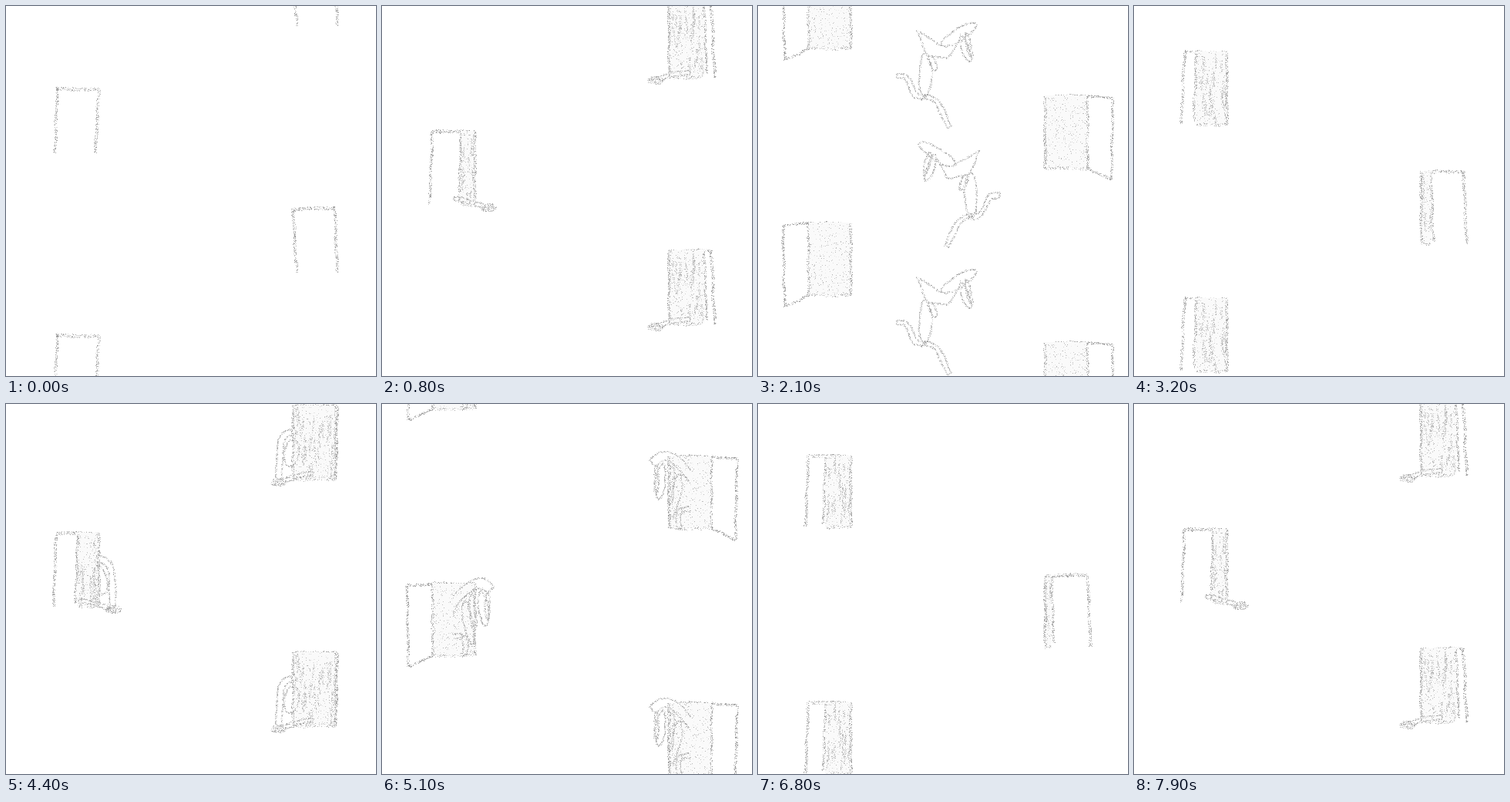
Animation, 480 px wide and 480 px high, one loop 8000 ms. Source, as an HTML page with a canvas:

```html
<!DOCTYPE html>
<html lang="en">
<head>
<meta charset="utf-8">
<title>Doors</title>
<style>
html, body { margin: 0; width: 100%; height: 100%; overflow: hidden; background: #fff; }
canvas { display: block; width: 480px; height: 480px; }
</style>
</head>
<body>
<canvas id="stage" width="480" height="480"></canvas>
<script>
const ctx = document.getElementById('stage').getContext('2d');
const STEP = 100, LOOP = 80, CYCLE = 71, HALF = CYCLE / 2;
const TILE = 320, MIRROR = 492;
const HINGE = 65, JAMB = 120, SILL = 96, SHUT = 54, OPEN = -33;

let seed = 1;
function rnd() {
  seed = (seed + 0x6D2B79F5) | 0;
  let a = Math.imul(seed ^ (seed >>> 15), 1 | seed);
  a = (a + Math.imul(a ^ (a >>> 7), 61 | a)) ^ a;
  return ((a ^ (a >>> 14)) >>> 0) / 4294967296;
}

function ease(t) {
  t = Math.max(0, Math.min(1, t));
  return t * t * (3 - 2 * t);
}

// Current placement of the drawing
const pen = { flip: false, x: 0, y: 0, lo: 0, hi: 480 };

function dot(x, y, dark) {
  x += pen.x;
  if (x < pen.lo || x > pen.hi) return;
  if (pen.flip) x = MIRROR - x;
  const g = Math.floor(dark + rnd() * (250 - dark));
  ctx.fillStyle = `rgb(${g},${g},${g})`;
  ctx.fillRect(Math.round(x), Math.round(y + pen.y), 1, 1);
}

// Grainy stroke along a polyline
function pencil(pts, width = 3.6, density = 3, dark = 150) {
  const phase = rnd() * 6;
  let run = 0;
  for (let i = 1; i < pts.length; i++) {
    const [ax, ay] = pts[i - 1], [bx, by] = pts[i];
    const len = Math.hypot(bx - ax, by - ay) || 1;
    const nx = (ay - by) / len, ny = (bx - ax) / len;
    for (let n = len * density; n > 0; n--) {
      const u = rnd();
      const off = (rnd() - 0.5) * width + Math.sin((run + u * len) * 0.13 + phase) * 0.6;
      dot(ax + (bx - ax) * u + nx * off, ay + (by - ay) * u + ny * off, dark);
    }
    run += len;
  }
}

const outline = pts => pencil(pts, 2.2, 2.2, 160);

// Catmull-Rom curve through the points
function smooth(p) {
  const out = [], at = i => p[Math.max(0, Math.min(p.length - 1, i))];
  for (let i = 0; i < p.length - 1; i++) {
    const [a, b, c, d] = [at(i - 1), at(i), at(i + 1), at(i + 2)];
    for (let t = 0; t < 1; t += 0.2) {
      out.push([0, 1].map(q => b[q] + 0.5 * t * (c[q] - a[q] +
        t * (2 * a[q] - 5 * b[q] + 4 * c[q] - d[q] +
        t * (3 * b[q] - a[q] - 3 * c[q] + d[q])))));
    }
  }
  return [...out, at(p.length)];
}

// Outline of a limb around a centre line
function tube(pts, r = 3) {
  const c = smooth(pts), left = [], right = [];
  c.forEach(([x, y], i) => {
    const a = c[Math.max(0, i - 1)], b = c[Math.min(c.length - 1, i + 1)];
    const l = Math.hypot(b[0] - a[0], b[1] - a[1]) || 1;
    const nx = (a[1] - b[1]) / l * r, ny = (b[0] - a[0]) / l * r;
    left.push([x + nx, y + ny]);
    right.unshift([x - nx, y - ny]);
  });
  outline([...left, ...right, left[0]]);
}

// Slim closed loop between two points
function petal(ax, ay, bx, by, w) {
  const len = Math.hypot(bx - ax, by - ay), pts = [];
  for (let i = 0; i <= 24; i++) {
    const a = i * Math.PI / 12, u = (1 - Math.cos(a)) / 2, v = Math.sin(a) * w / len;
    pts.push([ax + (bx - ax) * u + (ay - by) * v, ay + (by - ay) * u + (bx - ax) * v]);
  }
  outline(pts);
}

function shade(x0, x1, y0, y1, ajar) {
  const w = x1 - x0, h = y1 - y0;
  if (w < 2) return;
  ctx.fillStyle = '#fafafa';
  ctx.fillRect(Math.round(pen.flip ? MIRROR - x1 : x0), Math.round(y0 + pen.y), Math.round(w), Math.round(h));
  for (let n = w * h * 0.075; n > 0; n--) dot(x0 + rnd() * w, y0 + rnd() * h, 178);
  if (!ajar) return;
  for (let n = w * 0.6; n > 0; n--) {
    const x = x0 + rnd() * w, y = y0 + rnd() * h * 0.8;
    pencil([[x, y], [x + rnd() * 2 - 1, y + h * 0.2]], 2.5, 1.6, 175);
  }
}

function door(w, top) {
  const edge = HINGE + w, low = SILL + top * 0.3;
  const lean = top * 0.25;
  pencil([[HINGE, top], [JAMB, top + 1]], 4.5);
  if (w > SHUT - 6) {
    pencil([[HINGE + 1, top - 3], [HINGE - 2, low]]);
    pencil([[JAMB, top], [JAMB - lean, low]]);
    return;
  }
  const out = w < 0, from = out ? HINGE : edge;
  shade(from, JAMB, top, low, w > OPEN * 0.7);
  pencil([[JAMB, top], [JAMB, low]]);
  pencil([[from, low], [JAMB, low]], 4, 1.4, 165);
  if (out) {
    const corner = [edge + 2, low - w * 0.45];
    pencil([[HINGE, top], [HINGE, low]], 3, 2.4);
    pencil([[HINGE, top], [edge, top + 3], corner, [HINGE, low]], 3.2, 2.8, 140);
  } else {
    pencil([[HINGE, top], [HINGE - 4, low]]);
    pencil([[edge, top + 2], [edge - 3, low - 4]], 3, 2.6);
  }
}

function foot(p, arms) {
  pen.x = (p - 8) * 4;
  pen.lo = 92;
  tube([[92, 89], [112, 92], [132, 98]], 2.5);
  for (let n = 170; n > 0; n--) {
    const a = rnd() * 2 * Math.PI, r = Math.sqrt(rnd());
    dot(137 + Math.cos(a) * r * 11, 100 + Math.sin(a) * r * 5.5, 155);
  }
  if (arms) {
    tube([[114, 33], [133, 46], [136, 96]], 4);
    petal(116, 44, 124, 80, 9);
  }
}

function strider() {
  outline([[237, 93], [205, 73], [219, 106], [246, 110], [262, 83]]);
  petal(237, 93, 283, 65, 8);
  petal(262, 80, 275, 113, 5);
  petal(269, 76, 277, 108, 3);
  petal(217, 103, 216, 161, 8);
  petal(222, 106, 230, 126, 4);
  tube([[179, 132], [192, 135], [203, 156], [216, 160]]);
  tube([[216, 158], [232, 167], [248, 199]]);
}

function leaper() {
  tube([[178, 125], [184, 93], [208, 66], [226, 61], [237, 70]], 6);
  petal(202, 84, 213, 140, 6);
  petal(212, 74, 215, 124, 4);
  petal(224, 70, 230, 117, 6);
  petal(232, 72, 233, 108, 3);
  tube([[147, 94], [154, 105], [159, 126], [200, 130]]);
  tube([[201, 129], [204, 140], [202, 155]]);
}

// Leaps down from one door to the next
function runner(p, second) {
  const q = p - (second ? 23.5 : 21);
  const dx = q * (q < 0 ? 12 : 24);
  if (dx < -130 || dx > 200) return;
  pen.x = dx;
  pen.y += dx * 0.6;
  pen.lo = 92;
  pen.hi = 412;
  (second ? leaper : strider)();
}

function side(k, flip) {
  const second = k >= HALF, p = k % HALF;
  const opening = ease((p - (flip ? 5.2 : 6.3)) / (flip ? 5.5 : 6));
  const closing = ease((p - (flip ? 24.7 : 26.9)) / 9.5);
  const w = SHUT + (OPEN - SHUT) * (opening - closing);
  const rest = Math.max(0, 1 - Math.min(p, HALF - p) / 4);
  const top = 18 * rest + 4 * Math.sin(Math.PI * p / HALF) ** 4;
  const base = ((flip ? 316 : 161) + (k - 8) * 2 * TILE / CYCLE) % TILE;
  for (let n = -2; n < 2; n++) {
    const place = { flip, x: 0, y: Math.round(base + n * TILE), lo: 0, hi: 480 };
    seed = k * 7919 + (flip ? 131 : 17);
    Object.assign(pen, place);
    door(w, top);
    if (p >= 7 && p < 10.5) foot(p, second);
    Object.assign(pen, place);
    runner(p, second);
  }
}

let shown = -1;
const start = performance.now();
function tick(now) {
  const step = Math.floor(Math.max(0, now - start) / STEP) % LOOP;
  if (step !== shown) {
    shown = step;
    ctx.fillStyle = '#fff';
    ctx.fillRect(0, 0, 480, 480);
    side(step % CYCLE, false);
    side(step % CYCLE, true);
  }
  requestAnimationFrame(tick);
}
tick(start);
</script>
</body>
</html>
```
